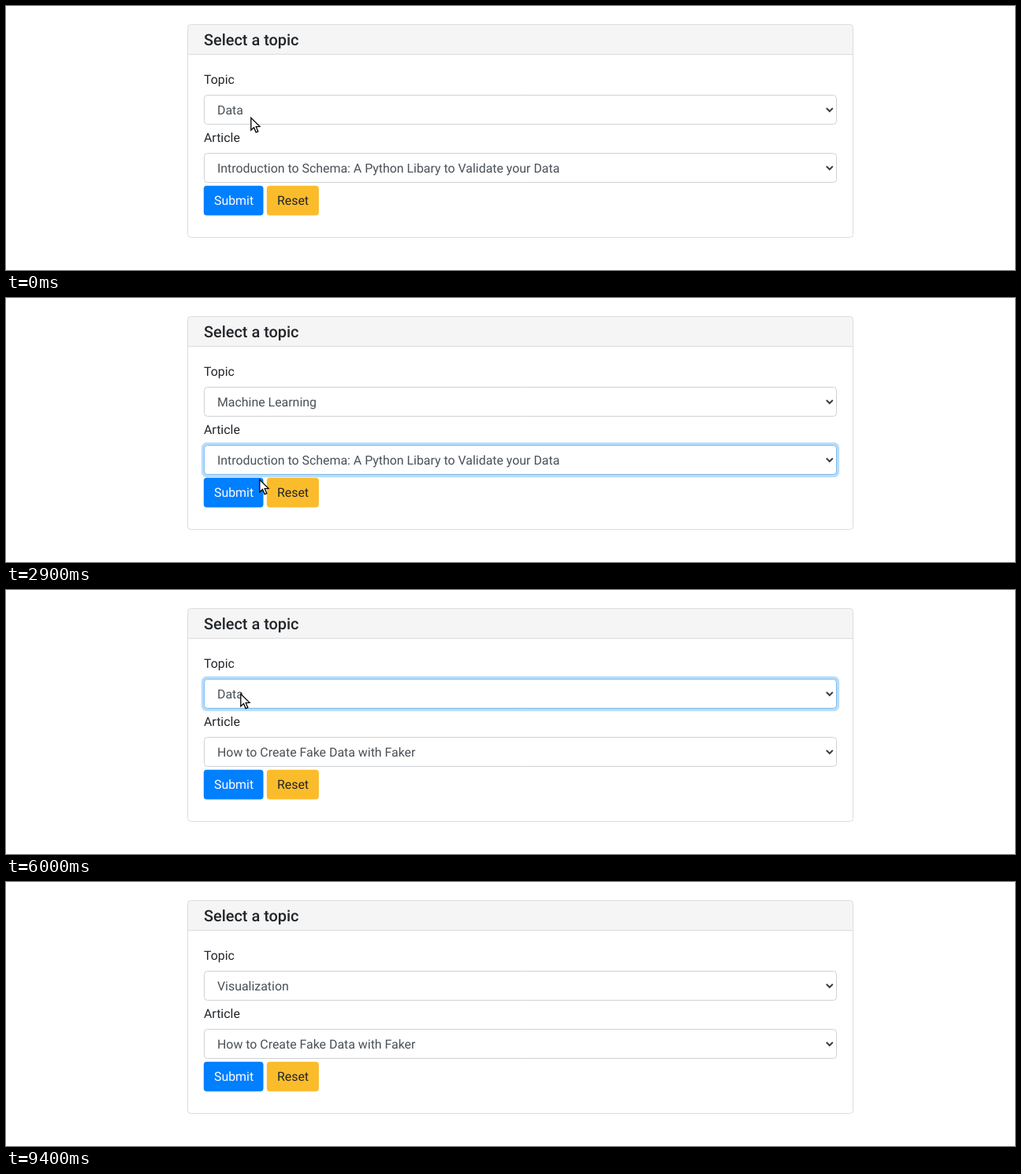
These frames come from a looping animation (1280 by 336 pixels, 9500 ms). An HTML page with a canvas:

```html
<!DOCTYPE html>
<html lang="en">
<head>
<meta charset="utf-8">
<title>Select a topic</title>
<style>
  html, body { margin: 0; width: 100%; height: 100%; overflow: hidden; background: #fff; }
  canvas { display: block; }
</style>
</head>
<body>
<canvas id="stage" width="1280" height="336"></canvas>
<script>
const ctx = document.getElementById('stage').getContext('2d');
const LOOP = 9500, STEP = 100, BLUR = 9400;
const LEFT = 251, WIDTH = 803, HEIGHT = 38, ROW = 22;
const INK = '#212529', SOFT = '#495057';

const fields = [
  { label: 'Topic', y: 113, options: ['Data', 'Machine Learning', 'Visualization'] },
  { label: 'Article', y: 187, options: [
    'Introduction to Schema: A Python Libary to Validate your Data',
    'How to Create Fake Data with Faker'
  ] }
];

// Pointer stops: arrival time, x, y.
const stops = [
  [0, 310, 141], [1000, 315, 179], [1800, 317, 191], [2800, 320, 249],
  [2900, 321, 230], [3500, 320, 187], [3800, 312, 169], [4100, 287, 118],
  [4400, 289, 123], [4800, 299, 168], [5700, 299, 158], [6000, 297, 131],
  [6400, 299, 176], [6800, 299, 198], [7400, 305, 188], [7600, 298, 152],
  [7900, 290, 137], [9100, 50, -22]
];

// Clicks alternate between opening a field and picking the row under the pointer.
const clicks = [300, 1000, 1900, 2800, 4200, 5000, 6100, 7000];

const smooth = k => k * k * (3 - 2 * k);
const listTop = f => f.y + HEIGHT + 1;
const rowAt = (f, p) => Math.floor((p.y - listTop(f)) / ROW);

function pointerAt(t) {
  const i = stops.findIndex(([at]) => at >= t);
  if (i < 1) return { x: stops.at(i)[1], y: stops.at(i)[2] };
  const [t0, x0, y0] = stops[i - 1], [t1, x1, y1] = stops[i];
  // Longer ways take longer; the pointer rests before it sets off.
  const glide = Math.min(600, t1 - t0, 200 + 2.5 * Math.hypot(x1 - x0, y1 - y0));
  const k = smooth(Math.max(0, 1 - (t1 - t) / glide));
  return { x: Math.round(x0 + (x1 - x0) * k), y: Math.round(y0 + (y1 - y0) * k) };
}

// A click opens or closes the list one step later; focus and value follow after two.
function stateAt(t) {
  const s = { values: [0, 0], focus: -1, open: -1 };
  for (const click of clicks) {
    if (t < click + STEP) break;
    const p = pointerAt(click), settled = t >= click + 2 * STEP;
    if (s.open < 0) {
      s.open = fields.findIndex(f => p.y >= f.y && p.y < f.y + HEIGHT);
      if (settled) s.focus = s.open;
    } else {
      if (settled) s.values[s.open] = rowAt(fields[s.open], p);
      s.open = -1;
    }
  }
  if (t >= BLUR) s.focus = -1;
  return s;
}

function text(str, x, y, color, font = '15.9px') {
  ctx.font = `${font} Roboto, sans-serif`;
  ctx.fillStyle = color;
  ctx.fillText(str, x, y);
}

function box(x, y, w, h, r, fill, stroke) {
  ctx.beginPath();
  ctx.roundRect(x, y, w, h, r);
  if (fill) { ctx.fillStyle = fill; ctx.fill(); }
  if (stroke) { ctx.strokeStyle = stroke; ctx.lineWidth = 1; ctx.stroke(); }
}

function drawButton(label, x, w, fill, color) {
  box(x, 228.7, w, 37.7, 4, fill);
  text(label, x + 13.2, 253, color);
}

function drawCard() {
  box(231, 24, 843, 37, [3, 3, 0, 0], '#f5f5f5');
  ctx.fillStyle = '#dcdcdc';
  ctx.fillRect(231, 61, 843, 1);
  box(230.5, 23.5, 844, 271, 4, null, '#dcdcdc');
  text('Select a topic', LEFT, 50, INK, '500 19.9px');
  drawButton('Submit', 250.8, 75.7, '#007fff', '#fff');
  drawButton('Reset', 330.8, 66.1, '#fbbc2c', INK);
}

function drawField(f, value, focused) {
  text(f.label, LEFT, f.y - 14, INK);
  if (focused) box(LEFT - 3.2, f.y - 3.2, WIDTH + 6.4, HEIGHT + 6.4, 7, '#b7ddfa');
  box(LEFT + .5, f.y + .5, WIDTH - 1, HEIGHT - 1, 4, '#fff', focused ? '#80b9ea' : '#ced1d5');
  text(f.options[value], 268, f.y + 25, SOFT);
  ctx.beginPath();
  ctx.moveTo(1040.8, f.y + 17);
  ctx.lineTo(1044.8, f.y + 21);
  ctx.lineTo(1048.8, f.y + 17);
  ctx.strokeStyle = '#3b4046';
  ctx.lineWidth = 2;
  ctx.stroke();
}

function drawList(f, value, pointer) {
  const top = listTop(f), h = f.options.length * ROW, hover = rowAt(f, pointer);
  const active = f.options[hover] ? hover : value;
  ctx.save();
  ctx.shadowColor = 'rgba(0,0,0,.32)';
  ctx.shadowBlur = 9;
  ctx.shadowOffsetY = 2;
  ctx.fillStyle = '#fff';
  ctx.fillRect(LEFT, top - 1, WIDTH - 1, h + 2);
  ctx.restore();
  f.options.forEach((name, i) => {
    const y = top + i * ROW;
    if (i === active) {
      ctx.fillStyle = '#0093fa';
      ctx.fillRect(LEFT + 1, y, WIDTH - 3, ROW);
    }
    text(name, 268, y + 17, i === active ? '#fff' : SOFT);
  });
  ctx.strokeStyle = '#6c6e70';
  ctx.lineWidth = 1;
  ctx.strokeRect(LEFT + .5, top - .5, WIDTH - 2, h + 1);
}

function drawPointer({ x, y }) {
  ctx.save();
  ctx.translate(x, y);
  ctx.beginPath();
  [[.8, 1.2], [.8, 17], [4.5, 13.7], [7.2, 19.8], [9.8, 18.7], [7.2, 12.7], [12, 12.4]]
    .forEach(([px, py]) => ctx.lineTo(px, py));
  ctx.closePath();
  ctx.fillStyle = '#fff';
  ctx.fill();
  ctx.strokeStyle = '#000';
  ctx.lineWidth = 1.3;
  ctx.stroke();
  ctx.restore();
}

function draw(t) {
  const { values, focus, open } = stateAt(t), pointer = pointerAt(t);
  ctx.fillStyle = '#fff';
  ctx.fillRect(0, 0, 1280, 336);
  drawCard();
  fields.forEach((f, i) => drawField(f, values[i], i === focus));
  if (open >= 0) drawList(fields[open], values[open], pointer);
  drawPointer(pointer);
}

ctx.textRendering = 'geometricPrecision';
const start = performance.now();
function tick() {
  const t = (performance.now() - start) % LOOP;
  draw(Math.floor(t / STEP) * STEP);
  requestAnimationFrame(tick);
}
tick();
</script>
</body>
</html>
```
